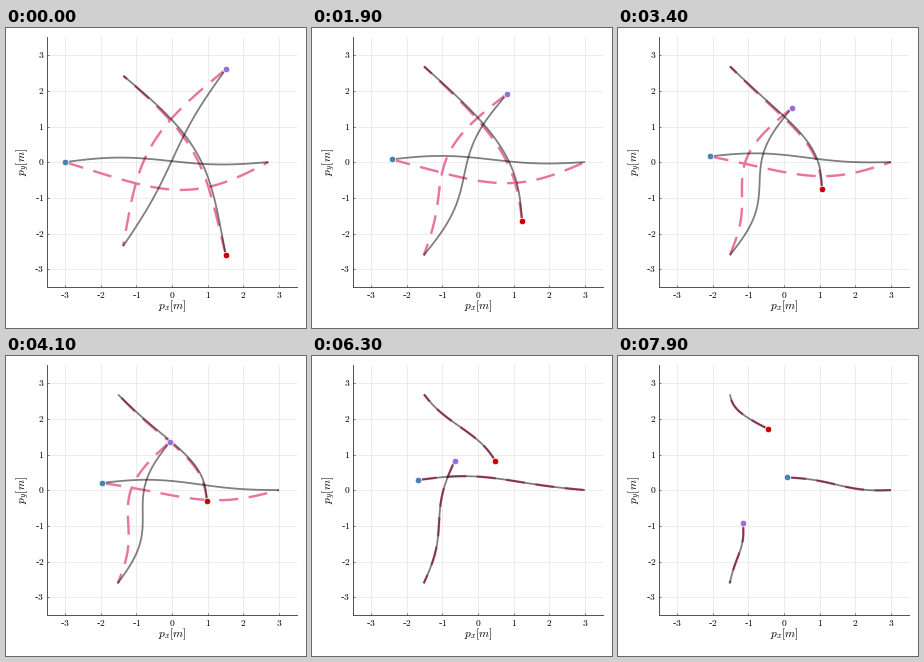
Write a matplotlib script that moves like this. It is 300 px wide and 300 px high and loops after 8 s.

```python
import numpy as np
import matplotlib.pyplot as plt
from matplotlib.animation import FuncAnimation

plt.rcParams.update({
    "mathtext.fontset": "cm",
    "font.family": "Liberation Serif",
    "lines.scale_dashes": False,
})

SIZE, DPI = 300, 100
PT = 72 / DPI                       # points per pixel
FRAMES, STEP = 80, 100
UNIT, CX, CY = 35.7, 166, 134.9     # pixels per metre, position of (0, 0)
AGREE = 6.3                         # second at which both paths coincide

KEYS = np.array([0, 2.7, 4.1, 6.3, 7.9])
S = np.linspace(0, 1, 120)
ARC, WAVE = np.sin(np.pi * S), np.sin(2 * np.pi * S)


def hermite(points, t):
    """Smooth motion through the waypoints at the key times."""
    p = np.asarray(points, float)
    m = np.gradient(p, KEYS, axis=0, edge_order=2)
    i = min(np.searchsorted(KEYS, t, side="right") - 1, len(KEYS) - 2)
    h = KEYS[i + 1] - KEYS[i]
    u = (t - KEYS[i]) / h
    ease = u * u * (3 - 2 * u)
    return (p[i] + (p[i + 1] - p[i]) * ease
            + h * u * (1 - u) * ((1 - u) * m[i] - u * m[i + 1]))


class Agent:
    """Moves through waypoints; plans a chord to its goal, bent along `side`."""

    def __init__(self, color, side, way, goal, bow, sway, gap):
        self.color, self.side, self.way = color, np.array(side), way
        self.goal, self.bow, self.sway, self.gap = np.array(goal), bow, sway, gap

    def paths(self, t):
        start = hermite(self.way, t)
        short = 0.05 * max(0, 1 - t / 0.8)
        end = self.goal + short * (np.array(self.way[0]) - self.goal)
        chord = start + np.outer(S, end - start)
        gap = self.gap * max(0, 1 - t / AGREE) ** 0.6
        bend = self.bow(t) * ARC + self.sway(t) * WAVE
        return (chord + np.outer(bend, self.side),
                chord + np.outer(bend + gap * ARC, self.side))


agents = [
    Agent("steelblue", (0, 1),
          [(59, 134.7), (86.5, 130.5), (96.3, 127.5), (105.8, 124.7), (169, 122)],
          goal=(273, 134.7), gap=28.5,
          bow=lambda t: np.interp(t, [0, 2.7, AGREE, 7.9], [-1.5, -1.6, -6, 1.5]),
          sway=lambda t: -3.4 + 0.2 * t),
    Agent("mediumpurple", (1, 0),
          [(219.7, 42), (184.3, 74.5), (164, 86.3), (142.8, 105.3), (125, 168)],
          goal=(111.7, 228), gap=-28,
          bow=lambda t: -1.2 + 4 * (t / 7.9) ** 6,
          sway=lambda t: -9 * np.sin(np.pi * (t + 1) / 8.5)),
    Agent("#cc0000", (1, 0),
          [(219.7, 227.3), (206.5, 177), (201, 145.5), (183.2, 105.2), (150.4, 73.8)],
          goal=(112, 39), gap=-3,
          bow=lambda t: 28.5 * np.cos(np.pi * t / 13),
          sway=lambda t: 5 * np.sin(np.pi * (t - 1.5) / 6.5)),
]

fig = plt.figure(figsize=(SIZE / DPI, SIZE / DPI), dpi=DPI, facecolor="white")
ax = fig.add_axes([41 / SIZE, 40.6 / SIZE, 250 / SIZE, 250 / SIZE])
ax.set_xlim(41, 291)
ax.set_ylim(260, 10)
ax.set_axisbelow(True)

marks = np.arange(-3, 4)
ax.set_xticks(CX + UNIT * marks, [""] * len(marks))
ax.set_yticks(CY - UNIT * marks, [""] * len(marks))
ax.tick_params(direction="in", length=2.5 * PT, width=0.7 * PT, color="#444444")
ax.grid(color="#e8e8e8", linewidth=0.8 * PT)
ax.spines[["top", "right"]].set_visible(False)
ax.spines[["left", "bottom"]].set(linewidth=0.9 * PT, color="#444444")


def label(x, y, s, px, **kw):
    ax.text(x, y, s, fontsize=px * PT, va="center", clip_on=False, **kw)


for k in marks:
    name = "-" * (k < 0) + rf"$\mathrm{{{abs(k)}}}$"
    label(CX + UNIT * k, 267.3, name, 9.6, ha="center")
    label(38, CY - UNIT * k, name, 9.6, ha="right")
label(166.3, 278.5, "$p_x[m]$", 11.5, ha="center")
label(17.3, 135, "$p_y[m]$", 11.5, ha="center", rotation=90)

dash = (0, (19 * PT, 10.6 * PT))
guesses, plans, dots = [], [], []
for ag in agents:
    guesses += ax.plot([], [], color="#e9749f", lw=2.4 * PT, ls=dash,
                       dash_capstyle="butt", zorder=3)
    plans += ax.plot([], [], color="black", alpha=0.5, lw=1.8 * PT,
                     solid_capstyle="butt", zorder=4)
    dots += ax.plot([], [], "o", color=ag.color, ms=6.6 * PT, mec="white",
                    mew=0.8 * PT, zorder=5)


def update(i):
    t = i * STEP / 1000
    for ag, guess, plan, dot in zip(agents, guesses, plans, dots):
        solid, dashed = ag.paths(t)
        plan.set_data(*solid.T)
        guess.set_data(*dashed.T)
        dot.set_data(*solid[:1].T)
    return guesses + plans + dots


anim = FuncAnimation(fig, update, frames=FRAMES, interval=STEP,
                     repeat=True, repeat_delay=0)
plt.show()
```
